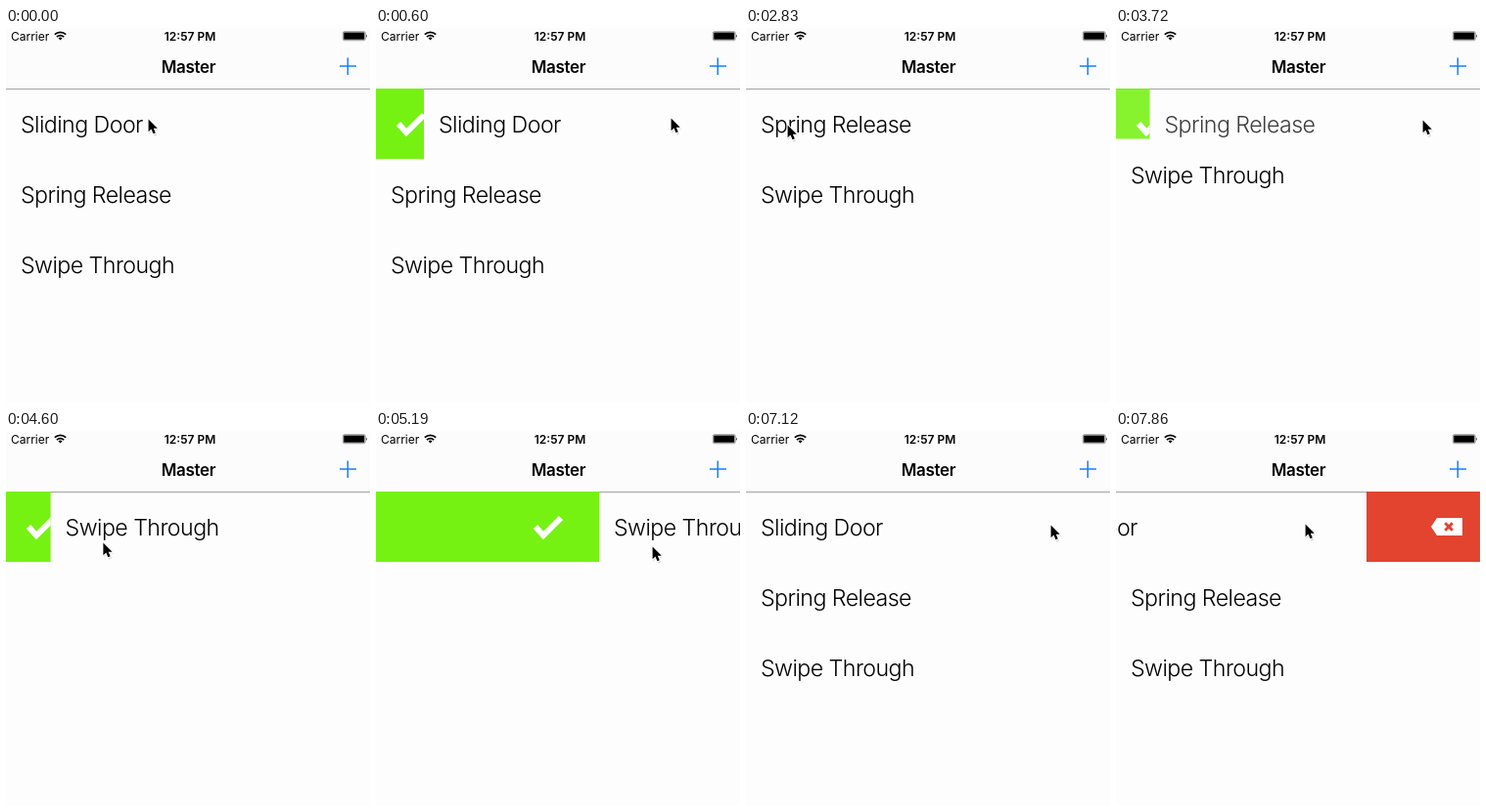
Write an HTML page that moves like this. It is 372 by 384 pixels and loops after 8000 ms.

```html
<!DOCTYPE html>
<html lang="en">
<head>
<meta charset="utf-8">
<title>Swipeable list</title>
<style>
  html, body { margin: 0; width: 100%; height: 100%; overflow: hidden; background: #fdfdfd; }
  body > svg { display: block; width: 372px; height: 384px; }
  text { font-family: Inter, Roboto, "Liberation Sans", sans-serif; }
  .row text { font-size: 23.2px; font-weight: 300; letter-spacing: -.55px; }
  .status { font-size: 12px; }
  .bold { font-weight: 600; text-anchor: middle; }
  .title { font-size: 17px; letter-spacing: -.3px; }
  .check { fill: none; stroke: #fff; stroke-width: 6; }
</style>
</head>
<body>
<svg viewBox="0 0 372 384">
  <rect width="372" height="62" fill="#fcfcfc"/>
  <path d="M0 62.5H372" stroke="#a3a3a3"/>
  <text class="status" x="5" y="12.5">Carrier</text>
  <g fill="none" stroke="#000" stroke-width="1.7">
    <path d="M49.8 6.7a8 8 0 0 1 11.4 0M51.9 9.1a5 5 0 0 1 7.2 0"/>
    <path d="M55.5 12.6l-2-2a2.8 2.8 0 0 1 4 0z" fill="#000" stroke="none"/>
  </g>
  <text class="status bold" x="188" y="12.5">12:57 PM</text>
  <rect x="344.3" y="3.7" width="22.9" height="9" rx="1.5" fill="none" stroke="#555" stroke-width=".6"/>
  <rect x="345.2" y="4.6" width="21.1" height="7.2" rx=".6"/>
  <path d="M368 6.5q1.6 1.8 0 3.6z"/>
  <text class="title bold" x="186.5" y="46">Master</text>
  <path d="M341 39H358M349.3 30.5V48" stroke="#157efb" stroke-width="1.5"/>

  <g id="list"></g>

  <g id="cursor">
    <path d="M1 3V16.5l3.3-3 2.2 5.2 2.6-1.1-2.2-5H11.5z" opacity=".15"/>
    <path d="M.6 1.4V14.2l2.9-2.7 2 4.7 2.3-1-2-4.5H9.8z" stroke="#fff" paint-order="stroke" stroke-width="2"/>
  </g>
</svg>
<script>
const LOOP = 8000, STEP = 148.3, TOP = 62, ROW = 72, WIDTH = 372;
const REFILL = 43, PULL = 48; // steps when the rows return and when the first is pulled left

// Each row is dragged to `reach`, then let go to `rest`; it closes over the steps in `close`.
const rows = [
  { name: "Sliding Door", drag: [0, 3], reach: 130, rest: 49, close: [10.75, 13], pull: 118 },
  { name: "Spring Release", drag: [20, 24], reach: 150, rest: 34.5, close: [24, 26.8], pull: 0 },
  { name: "Swipe Through", drag: [30, 35], reach: 228, rest: WIDTH, close: [35, 37], pull: 0 },
];

// Pointer moves: first step, last step, end point.
const home = [145, 92];
const moves = [
  [0, 4, 301, 91], [5, 9, 33, 100], [14, 17, 51, 102], [17, 19, 42, 98], [20, 24, 313, 93],
  [25, 30, 53, 112], [30, 35, 282, 117], [40, 43, 356, 42], [45, 48, 311, 95], [48, 53, 193, 94],
];

const ramp = (n, from, to) => Math.min(1, Math.max(0, (n - from) / (to - from)));
const ease = (...range) => (1 - Math.cos(Math.PI * ramp(...range))) / 2;
const mix = (a, b, p) => a + (b - a) * p;

function offsetOf({ drag, reach, rest, pull }, n) {
  if (n > REFILL) return -pull * ramp(n, PULL, PULL + 5);
  return mix(reach * ramp(n, ...drag), rest, ramp(n, drag[1], drag[1] + 1));
}

function heightOf({ close }, n) {
  return ROW * (n > REFILL ? ease(n, REFILL, REFILL + 3) : 1 - ease(n, ...close));
}

function pointerAt(n) {
  return moves.reduce(([x, y], [from, to, endX, endY]) => {
    const p = ramp(n, from, to);
    return [mix(x, endX, p), mix(y, endY, p)];
  }, home);
}

function set(node, attrs) {
  for (const key in attrs) node.setAttribute(key, attrs[key]);
}

const list = document.getElementById("list");
const cursor = document.getElementById("cursor");

list.innerHTML = rows.map(row => `
  <svg class="row" width="${WIDTH}" overflow="hidden">
    <svg class="done" height="${ROW}" overflow="hidden">
      <rect width="${WIDTH}" height="${ROW}" fill="#76f212"/>
      <path class="check" d="M3 36l8 9 18-18"/>
    </svg>
    <svg class="remove" height="${ROW}" overflow="hidden">
      <rect width="${WIDTH}" height="${ROW}" fill="#e24430"/>
      <g class="erase">
        <path d="M322 36l6-9h26v18h-26z" fill="#fff"/>
        <path d="M336.3 32.2l7.6 7.6m0-7.6l-7.6 7.6" stroke="#e24430" stroke-width="3"/>
      </g>
    </svg>
    <text y="45">${row.name}</text>
    <path class="line" stroke="#c3c3c6"/>
  </svg>`).join("");

[...list.children].forEach((node, i) => {
  rows[i].node = node;
  for (const part of ["done", "remove", "check", "erase", "line"])
    rows[i][part] = node.querySelector("." + part);
  rows[i].text = node.querySelector("text");
});

function draw(n) {
  const heights = rows.map(row => heightOf(row, n));
  // Separators show while a full list opens or closes.
  const lines = heights.every(h => h > 0) && heights.some(h => h < ROW);
  let y = TOP;
  rows.forEach((row, i) => {
    const height = heights[i], open = height / ROW;
    const offset = offsetOf(row, n);
    const green = Math.max(0, offset);
    const red = Math.max(0, -offset - 2);
    set(row.node, { y, height });
    set(row.text, { x: 15 + offset, opacity: open ** .8 });
    set(row.done, { width: green, opacity: open ** .4 });
    set(row.check, { transform: `translate(${Math.max(20, green - 68)} 0)` });
    set(row.remove, { x: WIDTH - red, width: red });
    set(row.erase, { transform: `translate(${red - WIDTH} 0)` });
    set(row.line, { d: `M15 ${height - .5}H${WIDTH}`, opacity: lines && i ? 1 : 0 });
    y += height;
  });
  set(cursor, { transform: `translate(${pointerAt(n)})` });
}

const start = performance.now();
function tick() {
  const t = Math.max(0, performance.now() - start) % LOOP;
  draw(Math.floor((t + 5) / STEP));
  requestAnimationFrame(tick);
}
tick();
</script>
</body>
</html>
```
